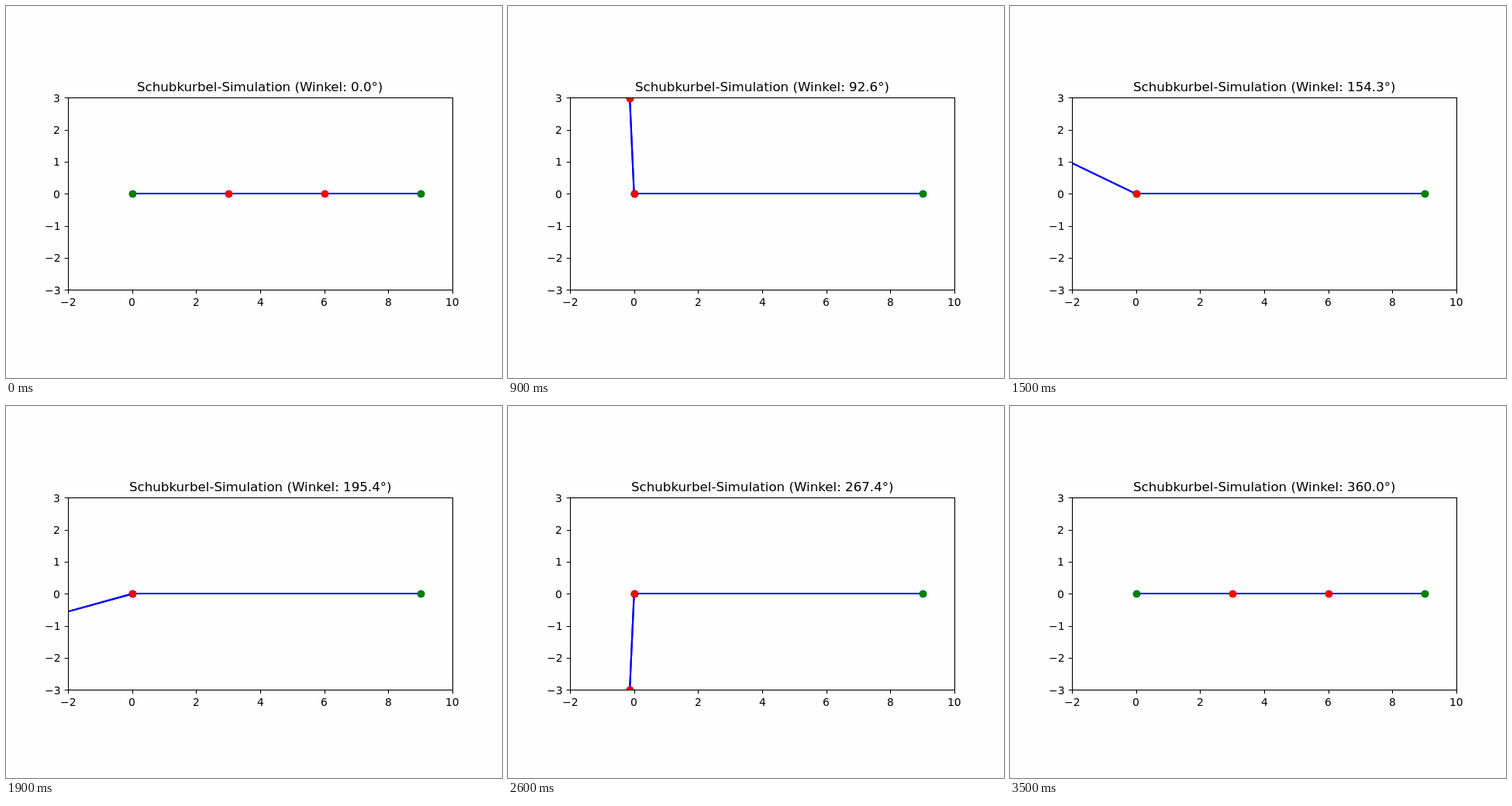
These frames come from a looping animation (640x480 px, 3.6 s). An HTML page with a canvas:

```html
<!DOCTYPE html>
<html lang="de">
<head>
<meta charset="utf-8">
<title>Schubkurbel-Simulation</title>
<style>
  html, body { margin: 0; width: 100%; height: 100%; overflow: hidden; background: #fefefe; }
  canvas { display: block; }
</style>
</head>
<body>
<canvas id="stage" width="640" height="480"></canvas>
<script>
const ctx = document.getElementById('stage').getContext('2d');
const STEPS = 36, STEP_MS = 100;
const CRANK = 3, ROD = 3, WALL = 9;
const UNIT = 496 / 12;
const LEFT = 80, TOP = 118.4, WIDTH = 496, HEIGHT = 248;
const PT = 100 / 72;

const px = x => LEFT + (x + 2) * UNIT;
const py = y => TOP + (3 - y) * UNIT;
const snap = v => Math.floor(v + 0.5);

function segment(x1, y1, x2, y2) {
  let ends = [px(x1), py(y1), px(x2), py(y2)];
  if (Math.abs(y1 - y2) < 1e-9) ends = ends.map(snap);
  ctx.beginPath();
  ctx.moveTo(ends[0], ends[1]);
  ctx.lineTo(ends[2], ends[3]);
  ctx.stroke();
}

function dot(x, y, color) {
  ctx.fillStyle = color;
  ctx.beginPath();
  ctx.arc(snap(px(x)) + 0.5, snap(py(y)) + 0.5, 3.5 * PT, 0, Math.PI * 2);
  ctx.fill();
}

function label(text, x, y, size, align) {
  ctx.font = size * PT + 'px "DejaVu Sans", sans-serif';
  ctx.textAlign = 'left';
  ctx.fillStyle = '#000';
  ctx.fillText(text, Math.round(x - ctx.measureText(text).width * align), y);
}

function drawAxes() {
  ctx.strokeStyle = '#000';
  ctx.lineWidth = 0.8 * PT;
  ctx.lineCap = 'butt';
  const name = v => String(v).replace('-', '\u2212');
  const bottom = snap(TOP + HEIGHT) + 0.5, left = LEFT + 0.5;
  ctx.beginPath();
  for (let v = -2; v <= 10; v += 2) {
    const x = snap(px(v)) + 0.5;
    ctx.moveTo(x, bottom);
    ctx.lineTo(x, bottom + 3.5 * PT);
    label(name(v), px(v), 387, 10, 0.5);
  }
  for (let v = -3; v <= 3; v++) {
    const y = snap(py(v)) + 0.5;
    ctx.moveTo(left, y);
    ctx.lineTo(left - 3.5 * PT, y);
    label(name(v), LEFT - 7 * PT, Math.round(py(v) + 5.3), 10, 1);
  }
  ctx.stroke();
  ctx.strokeRect(left, snap(TOP) + 0.5, WIDTH, HEIGHT);
}

function drawLinkage(angle) {
  const x = CRANK * Math.cos(angle), y = CRANK * Math.sin(angle);
  const slider = x + Math.sqrt(Math.max(0, ROD * ROD - y * y));
  ctx.save();
  ctx.beginPath();
  ctx.rect(LEFT, snap(TOP), WIDTH, HEIGHT);
  ctx.clip();
  ctx.strokeStyle = '#00f';
  ctx.lineWidth = 1.5 * PT;
  ctx.lineCap = 'square';
  segment(0, 0, x, y);
  segment(x, y, slider, 0);
  segment(slider, 0, WALL, 0);
  const joints = [[0, 0, 'green'], [WALL, 0, 'green'], [x, y, 'red'], [slider, 0, 'red']];
  for (const [jx, jy] of joints) dot(jx, jy, '#00f');
  for (const joint of joints) dot(...joint);
  ctx.restore();
}

function render(now) {
  const step = Math.floor(now / STEP_MS + 1e-6) % STEPS;
  const degrees = 360 * step / (STEPS - 1);
  ctx.fillStyle = '#fefefe';
  ctx.fillRect(0, 0, 640, 480);
  drawLinkage(degrees * Math.PI / 180);
  drawAxes();
  label(`Schubkurbel-Simulation (Winkel: ${degrees.toFixed(1)}°)`, 328, 110, 12, 0.5);
}

let start;
function tick(now) {
  start ??= now;
  render(now - start);
  requestAnimationFrame(tick);
}
render(0);
requestAnimationFrame(tick);
</script>
</body>
</html>
```
